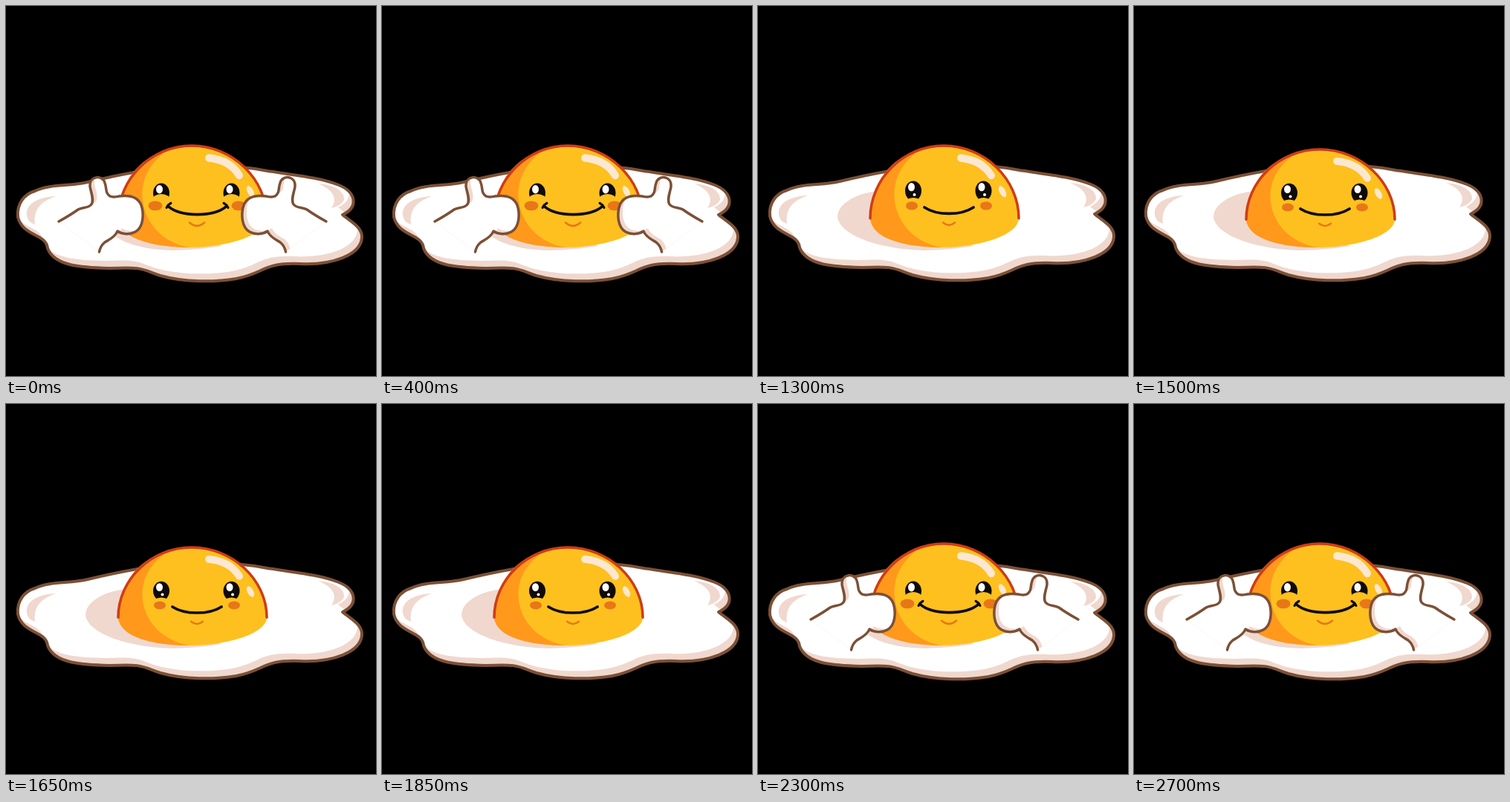
An HTML page with a canvas for the animation above (2.75 s loop, 498 by 498 pixels).

```html
<!DOCTYPE html>
<html lang="en">
<head>
<meta charset="utf-8">
<title>Happy egg</title>
<style>
  html, body { margin: 0; height: 100%; overflow: hidden; background: #000; }
  canvas { display: block; }
</style>
</head>
<body>
<canvas id="stage" width="498" height="498"></canvas>
<script>
const ctx = document.getElementById('stage').getContext('2d');
const LOOP = 2750, STEP = 50;
const BROWN = '#7b5036', PINK = '#f0d8ce', YOLK = '#fec01f', INK = '#100b08';
const CHEEK = '#e87718', SHINE = '#fce8d2';

const mix = (a, b, k) => a + (b - a) * k;
const progress = (t, from, to) => Math.min(1, Math.max(0, (t - from) / (to - from)));
const bump = (t, from, to) => Math.sin(Math.PI * progress(t, from, to)) ** 2;
function ease(t, from, to) {
  const u = progress(t, from, to);
  return u * u * (3 - 2 * u);
}

function fill(path, color) {
  ctx.fillStyle = color;
  ctx.fill(path);
}

function stroke(path, color, width) {
  ctx.strokeStyle = color;
  ctx.lineWidth = width;
  ctx.stroke(path);
}

function ellipse(x, y, rx, ry, color, angle = 0) {
  const path = new Path2D();
  path.ellipse(x, y, rx, ry, angle, 0, Math.PI * 2);
  fill(path, color);
}

// Fills a shape with shade, then lights it with a shifted copy of itself.
function fillShaded(path, dx, dy, lit = path) {
  fill(path, PINK);
  ctx.save();
  ctx.clip(path);
  ctx.translate(dx, dy);
  fill(lit, '#fff');
  ctx.restore();
}

const white = new Path2D(`M39 248C60 238 85 242 110 236C190 217 265 204 352 221
  C400 228 425 231 448 240C470 249 476 269 453 280C465 290 480 297 479 311
  C477 334 440 348 396 346C345 344 350 358 310 366C280 371 240 371 208 362
  C182 353 185 350 140 352C105 351 65 350 56 325C54 305 22 309 16 283C14 265 25 252 39 248Z`);
const glints = new Path2D(`M67 255C42 256 26 266 28 281Q29 290 39 293C37 275 44 263 67 255Z
  M420 238C444 240 456 249 455 260Q451 268 438 271C447 258 440 246 420 238Z`);

const dome = 'M151 287C151 236 195 192 250 192S351 236 351 287';
const rind = new Path2D(dome);
const yolk = new Path2D(dome + 'C350 310 295 325 248 325S153 313 151 287Z');
const shade = new Path2D(`M151 287C151 240 180 207 217 198C190 217 181 240 184 264
  C188 294 211 319 248 325C195 325 153 313 151 287Z`);

function drawWhite(hands) {
  ctx.save();
  ctx.translate(0, hands);
  fillShaded(white, -6, -10);
  fill(glints, PINK);
  stroke(white, BROWN, 4);
  ctx.restore();

  const left = mix(107, 130, Math.min(hands, 1));
  fill(new Path2D(`M168 249C${left + 32} 249 ${left} 264 ${left} 284
    C${left + 3} 310 168 328 225 329Q262 328 290 323L200 270Z`), PINK);
}

function drawFace(smile) {
  const eyeY = mix(251, 254, smile);
  for (const x of [209, 303.5]) {
    ellipse(x, eyeY, 11, 13, INK);
    ellipse(x - 2.5, eyeY - 5, 4.5, 5.5, '#fff');
    ellipse(x + 1.5, eyeY + 5, 2, 2, '#fff');
    ellipse(x, mix(269, 264, smile), 12.5, 9, YOLK);
  }
  for (const side of [-1, 1]) {
    ellipse(257 + side * mix(50, 56, smile), 270.5, mix(8, 9.5, smile), mix(5.5, 6.2, smile), CHEEK);
  }

  const l = mix(224, 218, smile), r = mix(290, 297, smile), y = mix(272.5, 271, smile);
  const dip = y + mix(11, 14.5, smile);
  stroke(new Path2D(`M${l} ${y}C${l + 17} ${dip} ${r - 17} ${dip} ${r} ${y}`), INK, 3.6);
  const d = 4 * progress(smile, .4, 1);
  stroke(new Path2D(`M${l - d / 2} ${y + d / 2}Q${l} ${y - d / 2} ${l + d} ${y - d}
    M${r + d / 2} ${y + d / 2}Q${r} ${y - d / 2} ${r - d} ${y - d}`), INK, 3);
  const w = mix(8, 10, smile);
  stroke(new Path2D(`M${257 - w} 292.5Q257 ${mix(299, 301, smile)} ${257 + w} 292.5`), CHEEK, 2.5);
}

function drawYolk(top, smile) {
  ctx.save();
  ctx.translate(250, 325);
  ctx.scale(1, (325 - top) / 133);
  ctx.translate(-250, -325);
  fill(yolk, YOLK);
  fill(shade, '#ff981b');
  stroke(rind, '#cf3c16', 3.5);
  stroke(new Path2D('M273 208Q302 211 314 231'), SHINE, 10);
  ellipse(329, 252, 4, 8, SHINE, -.5);
  drawFace(smile);
  ctx.restore();
}

// The fist and thumb grow from the forearm, whose ends stay in place.
function drawHand(size, light) {
  const grow = text => text.replace(/(\d+) (\d+)/g,
    (_, x, y) => `${mix(98, x, size)} ${mix(310, y, size)}`);
  const outline = 'M71 290' + grow(`C82 284 90 279 97 274C103 270 110 273 115 267
    C119 261 114 250 113 243C112 228 130 227 133 238C136 246 133 251 140 256
    C144 258 147 257 152 256C167 254 178 258 182 268C186 280 185 298 174 304
    C165 309 154 306 150 303C147 311 138 315 133 318`) + 'Q127 323 125.5 331';
  const hand = new Path2D(outline);
  fillShaded(hand, light, -4, new Path2D(outline + 'L112 350L50 300Z'));
  stroke(hand, BROWN, 3.5);
}

function draw(now) {
  const t = Math.floor(now % LOOP / STEP) * STEP;
  const hands = 1 - ease(t, 1070, 1250) + ease(t, 1850, 2060) + .07 * bump(t, 2030, 2210);
  const smile = 1 - ease(t, 860, 1080) + ease(t, 1850, 2090);
  const top = 193 - 5 * hands - 12 * bump(t, 1020, 1380) - 6 * bump(t, 2000, 2240);

  ctx.clearRect(0, 0, 498, 498);
  ctx.lineCap = ctx.lineJoin = 'round';
  drawWhite(hands);
  drawYolk(top, smile);
  if (hands > .02) {
    ctx.save();
    ctx.globalAlpha = Math.min(1, hands * 4);
    drawHand(hands, 6);
    ctx.translate(502, 0);
    ctx.scale(-1, 1);
    drawHand(hands, -6);
    ctx.restore();
  }
}

const start = performance.now();
function loop() {
  draw(performance.now() - start);
  requestAnimationFrame(loop);
}
loop();
</script>
</body>
</html>
```
